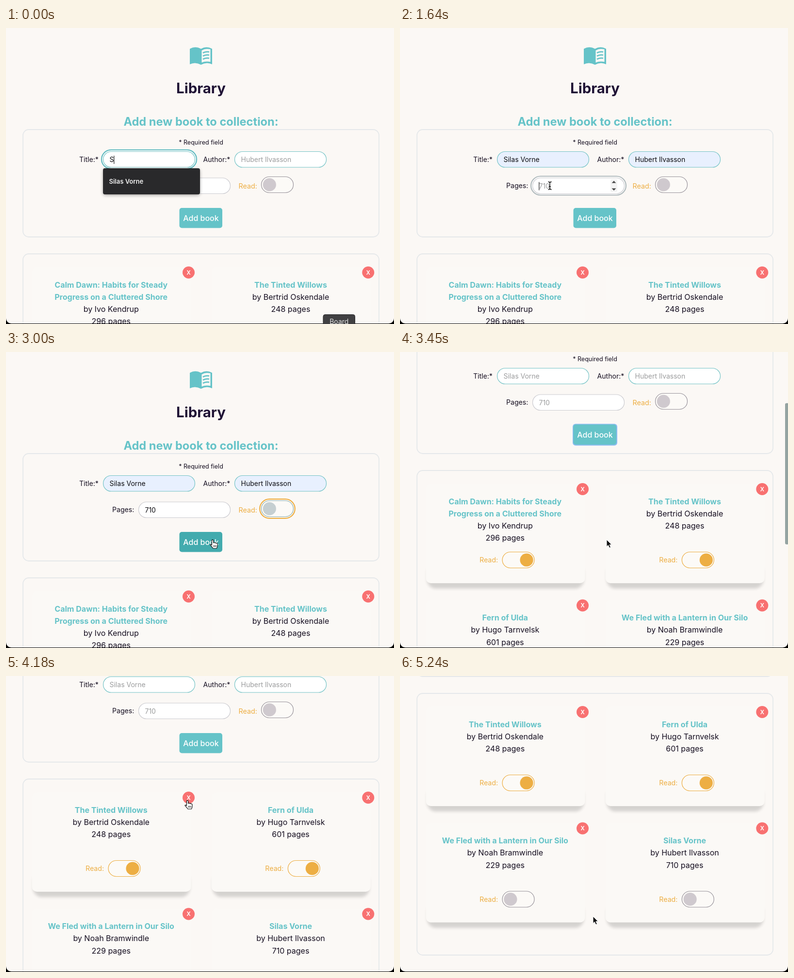
An HTML page for the animation above (5.4 s loop, 800 px wide and 612 px high).

```html
<!DOCTYPE html>
<html lang="en">
<head>
<meta charset="utf-8">
<title>Library</title>
<style>
  html, body { margin: 0; width: 100%; height: 100%; overflow: hidden; background: #000; }
  svg { display: block; width: 100vw; height: 100vh; font-family: Inter, "Open Sans", sans-serif; }
</style>
</head>
<body>
<svg id="stage" viewBox="0 0 800 612">
  <defs>
    <filter id="soft" x="-10%" y="-60%" width="120%" height="220%"><feGaussianBlur stdDeviation="3"/></filter>
  </defs>
  <g id="scene"></g>
</svg>
<script>
const LOOP = 5400, STEP = 91;
const TEAL = '#65c3c8', GOLD = '#edae43', INK = '#150e20', PAPER = '#fbf8f5', LINE = '#e5e8ea';
const NEW_TITLE = 'Silas Vorne', NEW_AUTHOR = 'Hubert Ilvasson', NEW_PAGES = '710';

const books = [
  { title: ['Calm Dawn: Habits for Steady', 'Progress on a Cluttered Shore'], author: 'Ivo Kendrup', pages: 296, read: true },
  { title: ['The Tinted Willows'], author: 'Bertrid Oskendale', pages: 248, read: true },
  { title: ['Fern of Ulda'], author: 'Hugo Tarnvelsk', pages: 601, read: true },
  { title: ['We Fled with a Lantern in Our Silo'], author: 'Noah Bramwindle', pages: 229, read: false },
  { title: [NEW_TITLE], author: NEW_AUTHOR, pages: NEW_PAGES, read: false }
];

// time, x, y, shape until the next key
const pointer = [
  [0, 690, 650, 'arrow'], [170, 690, 640, 'arrow'], [455, 290, 320, 'arrow'], [800, 290, 320, 'arrow'],
  [990, 506, 279, 'beam'], [1180, 506, 279, 'arrow'], [1270, 530, 318, 'arrow'], [1370, 530, 318, 'arrow'],
  [1630, 309, 326, 'beam'], [1810, 309, 326, ''], [2640, 309, 326, 'arrow'], [2990, 426, 388, 'hand'],
  [3260, 426, 388, 'arrow'], [3540, 426, 388, 'arrow'], [3800, 374, 257, 'hand'], [4200, 374, 257, 'arrow'],
  [4540, 398, 497, 'arrow'], [LOOP, 398, 497, 'arrow']
];

const shapes = {
  arrow: '<path d="M0 0V14.5L3.3 11.4L5.7 17L8.4 15.9L6 10.4H10.4Z" fill="#111" stroke="#fff"/>',
  beam: '<path d="M-3.5-8Q0-8 0-5.5Q0-8 3.5-8M0-6V6M-3.5 8Q0 8 0 5.5Q0 8 3.5 8M-2 2H2" fill="none" stroke="#111" stroke-width="1.4"/>',
  hand: '<path d="M-1.6 1.4Q0-1 1.6 1.4V6.4Q3.2 5 4.6 6.7Q6.3 5.7 7.4 7.4Q9.8 7 10 9V12.5Q10 15 8.3 18H1Q-2 14-5 10.8Q-4.6 8.8-1.6 11Z" fill="#fff" stroke="#111" stroke-width="1.2"/>' +
        '<path d="M2.2 11.5V15M4.6 11.5V15M7 11.5V15" stroke="#111"/>'
};

const pen = document.createElement('canvas').getContext('2d');
const scene = document.getElementById('scene');

const smooth = (t, a, b) => {
  const p = Math.min(1, Math.max(0, (t - a) / (b - a)));
  return p * p * (3 - 2 * p);
};
const text = (s, x, y, size, fill, extra = '') =>
  `<text x="${x}" y="${y}" font-size="${size}" fill="${fill}" ${extra}>${s}</text>`;
const mid = (s, x, y, size, fill, weight = 400) =>
  text(s, x, y, size, fill, `text-anchor="middle" font-weight="${weight}"`);
const box = (x, y, w, h, r, fill, stroke = 'none', sw = 1) =>
  `<rect x="${x}" y="${y}" width="${w}" height="${h}" rx="${r}" fill="${fill}" stroke="${stroke}" stroke-width="${sw}"/>`;

function field(x, y, o) {
  const left = x + 13.5, base = y + 22;
  let s = '';
  if (o.focus) s += box(x - 3, y - 3, 196, 39, 19.5, '#fdfdfc', o.ring, 2.2);
  s += box(x + .5, y + .5, 189, 32.5, 16.25, o.value && o.auto ? (o.focus ? '#e6f1f7' : '#e8f0fe') : '#fff', o.border, 1.2);
  s += o.value ? text(o.value, left, base, 14, '#0c0c10') : text(o.hint, left, base, 14, '#9b9c9d');
  if (o.focus) {
    pen.font = '14px Inter, "Open Sans", sans-serif';
    const end = left + pen.measureText(o.value).width + .3;
    s += `<path d="M${end} ${y + 9}v17" stroke="#111" stroke-width="1.1"/>`;
  }
  return s;
}

function toggle(x, y, on, focus) {
  return (focus ? box(x - 3.3, y - 3.3, 72.6, 39.6, 19.8, PAPER, GOLD, 2.2) : '') +
    box(x, y, 66, 33, 16.5, '#fcfaf7', focus ? '#8dafb0' : on ? GOLD : '#98939b', 1.2) +
    `<circle cx="${x + (on ? 50 : 16.8)}" cy="${y + 16.5}" r="13.6" fill="${focus ? '#c6cfd1' : on ? GOLD : '#cfc9ce'}"/>`;
}

function dropdown(x, label, hover) {
  return `<rect x="${x}" y="292" width="200" height="54" rx="5" fill="#0005" filter="url(#soft)"/>` +
    box(x, 290, 200, 54, 4, '#29292b') + (hover ? box(x, 300, 200, 34, 0, '#434346') : '') +
    text(label, x + 12.5, 322, 13, '#f2f2f2', 'font-weight="600"');
}

function header() {
  return `<path d="M379 43Q390.5 36.5 402 43Q413.5 36.5 425 43V75Q413.5 69.5 402 76Q390.5 69.5 379 75Z" fill="${TEAL}"/>` +
    `<path d="M403.5 46.5Q411 41.5 421.5 44V70Q411 68 403.5 71.5Z" fill="${PAPER}"/>` +
    `<path d="M406 51.5Q412 48 419 49.5M406 58Q412 54.5 419 56M406 64.5Q412 61 419 62.5" fill="none" stroke="${TEAL}" stroke-width="2.8"/>` +
    mid('Library', 402, 135, 29.4, '#1f1235', 700) +
    mid('Add new book to collection:', 402, 202, 23.6, TEAL, 700);
}

function form(t) {
  const sent = t >= 3080;
  const title = sent ? '' : t < 540 ? 'S' : NEW_TITLE;
  const author = !sent && t >= 1360 ? NEW_AUTHOR : '';
  const typed = [1990, 2130, 2260].filter(k => t >= k).length;
  const pages = sent ? '' : NEW_PAGES.slice(0, typed);
  const onPages = t >= 1630 && t < 2640;
  let s = box(35, 210, 734, 222, 12, 'none', LINE, 1.8) +
    mid('* Required field', 402, 241, 12.5, INK) +
    text('Title:*', 151, 277, 14.1, INK) + text('Author:*', 406.5, 277, 14.1, INK) +
    text('Pages:', 219, 331, 14.1, INK) + text('Read:', 479.5, 332, 14.3, GOLD) +
    field(200, 255, { value: title, hint: NEW_TITLE, auto: t >= 540, focus: t < 1080, ring: '#5fbac0', border: '#74c3c6' }) +
    field(471, 255, { value: author, hint: NEW_AUTHOR, auto: true, focus: t >= 1080 && t < 1630, ring: '#5fbac0', border: '#74c3c6' }) +
    field(273, 309.5, { value: pages, hint: NEW_PAGES, focus: onPages, ring: '#b0babd', border: '#cbcbd0' });
  if (onPages) s += box(434, 313, 14, 26, 2, '#f3f3f3') +
    '<path d="M436.5 320.5h9l-4.5-4.5zM436.5 331.5h9l-4.5 4.5z" fill="#444"/>';
  s += toggle(526.5, 307.5, false, t >= 2640 && !sent);
  if (sent && t < 4090) s += box(356, 370.5, 92, 45, 6, '#8bbcf0');
  s += box(357.5, 372, 88.5, 41.5, 5, t >= 2900 && t < 3260 ? '#43abae' : TEAL) + mid('Add book', 402, 399, 16, '#fff', 500);
  if (t < 800) s += dropdown(200, NEW_TITLE, t >= 450);
  if (t >= 1080 && t < 1360) s += dropdown(471, NEW_AUTHOR, t >= 1270);
  return s;
}

function card(book, i) {
  const dx = i % 2 * 370.3, y = Math.floor(i / 2) * 240.5, cx = 216.7;
  const lines = book.title.map(l => [l, TEAL, 700]);
  lines.push(['by ' + book.author, INK, 400], [book.pages + ' pages', INK, 400]);
  return `<g transform="translate(${dx} ${y})">` +
    '<rect x="56" y="660" width="323" height="51" rx="18" fill="#000" opacity=".15" filter="url(#soft)"/>' +
    box(53.5, 494, 328, 206, 10, '#fbf9f6') +
    lines.map(([l, fill, w], n) => mid(l, cx, 536.8 + n * 25.1, 16, fill, w)).join('') +
    text('Read:', 164, 657, 14.2, GOLD) + toggle(211, 635.5, book.read) +
    '<circle cx="376.5" cy="505.5" r="12.5" fill="#f87171"/>' + mid('x', 376.5, 509.7, 15.5, '#fff', 500) + '</g>';
}

function cursor(t) {
  const n = pointer.findIndex((k, i) => t >= k[0] && t < pointer[i + 1][0]);
  const [t0, x0, y0, shape] = pointer[n], [t1, x1, y1] = pointer[n + 1];
  if (!shape) return '';
  const p = smooth(t, t0, t1);
  return `<g transform="translate(${x0 + (x1 - x0) * p} ${y0 + (y1 - y0) * p})">${shapes[shape]}</g>`;
}

function draw(t) {
  const scroll = Math.round(254 * smooth(t, 3170, 3540) + 177 * smooth(t, 4395, 5090));
  const shelf = books.slice(t < 4090 ? 0 : 1, t < 3080 ? 4 : 5);
  const rows = Math.ceil(shelf.length / 2);
  const bottom = 527 + rows * 240.5, full = bottom + 35;
  let s = box(0, -20, 800, 631, 11, PAPER) + `<g transform="translate(0 ${-scroll})">` +
    header() + form(t) + box(35, 467, 734, bottom - 467, 12, 'none', LINE, 1.8) +
    shelf.map(card).join('') + '</g>';
  if (t >= 3170 && t < 4090) s += box(794, scroll * 612 / full, 8, 612 * 612 / full, 3, '#94a3a1');
  // rounded lower window edge
  s += '<path d="M0 600Q0 611 11 611H789Q800 611 800 600V612H0Z" fill="#000"/>';
  if (t < 170) s += box(654, 592.5, 65.5, 30, 4, '#404042', '#252527') + mid('Board', 686.8, 612, 14, '#e4e4e4');
  scene.innerHTML = s + cursor(t);
}

let shown = -1;
function tick() {
  const step = Math.floor((performance.now() % LOOP + 9) / STEP);
  if (step !== shown) draw(Math.min((shown = step) * STEP, LOOP - 1));
  requestAnimationFrame(tick);
}
tick();
</script>
</body>
</html>
```
